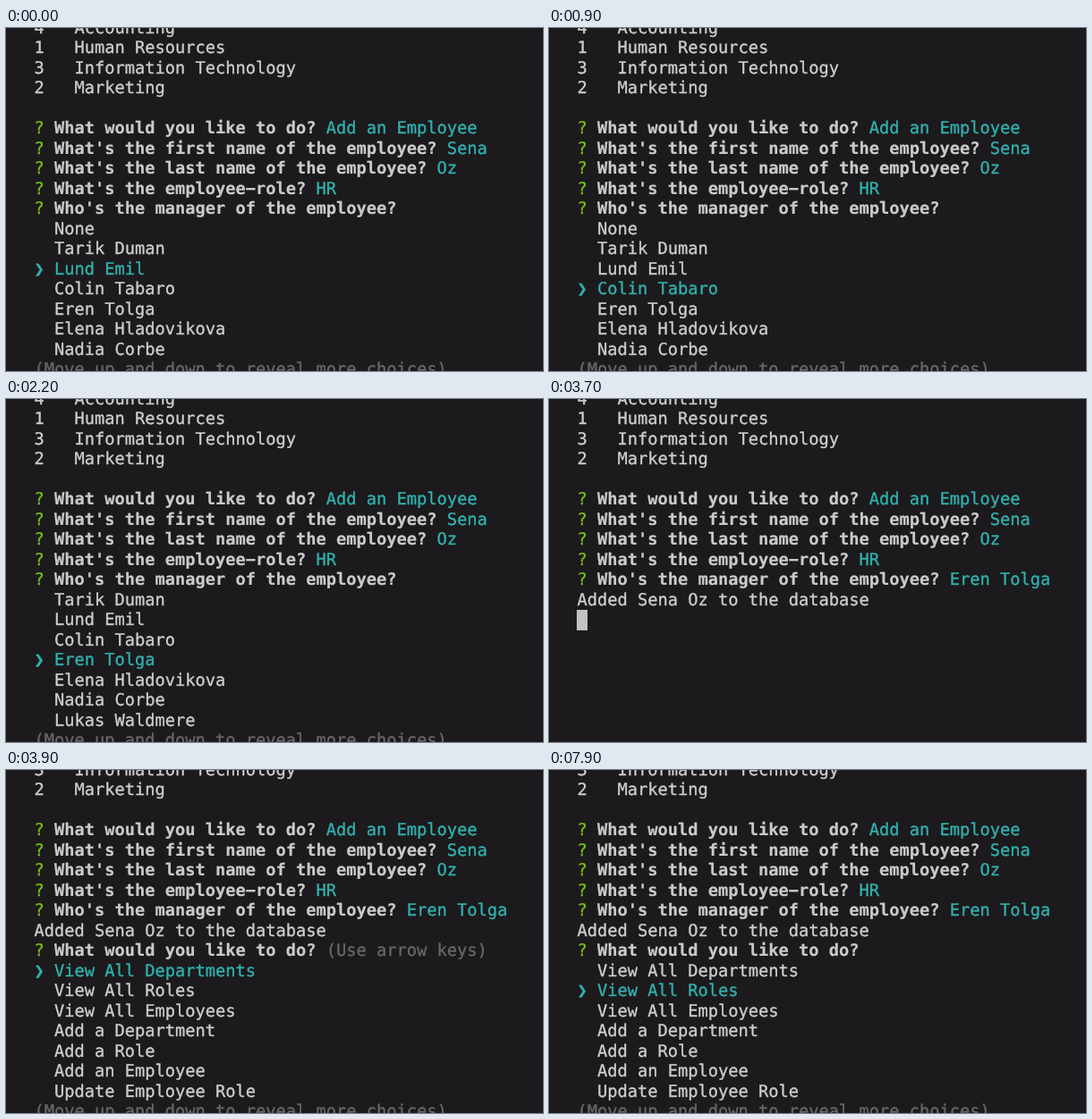
Write an HTML page that moves like this. It is 600 px wide and 384 px high and loops after 8 s.

```html
<!DOCTYPE html>
<html lang="en">
<head>
<meta charset="utf-8">
<title>Employee tracker</title>
<style>
  html, body { margin: 0; width: 100%; height: 100%; overflow: hidden; background: #1c1a1c; }
  #stage { position: relative; width: 600px; height: 384px; overflow: hidden; }
  #strip { animation: play 8s step-end infinite; }
  .screen { position: relative; height: 384px; overflow: hidden; }
  pre {
    position: absolute; left: 31.4px; top: -10.5px; margin: 0;
    font: 18.7px/22.5px "DejaVu Sans Mono", monospace;
    text-rendering: geometricPrecision; color: #cecdce;
    -webkit-text-stroke: 0.35px;
  }
  b { color: #cbcacb; -webkit-text-stroke-width: 0.2px; }
  .ask { color: #74c010; }
  .pick { color: #30b1af; }
  .hint { color: #686668; }
  .mark, .cursor { display: inline-block; width: 2ch; height: 22.5px; vertical-align: top; }
  .cursor { position: relative; top: -1px; width: 1ch; background: #c3c2c3; }
  @keyframes play {
    0% { transform: translateY(0); }
    11.25% { transform: translateY(-384px); }
    23.75% { transform: translateY(-768px); }
    46.25% { transform: translateY(-1152px); }
    47.5% { transform: translateY(-1536px); }
    98.75%, 100% { transform: translateY(-1920px); }
  }
</style>
</head>
<body>
<div id="stage"><div id="strip"></div></div>
<script>
  const span = (cls, text = '') => `<span class="${cls}">${text}</span>`;
  const ask = (question, answer = '', cls = 'pick') =>
    `${span('ask', '?')} <b>${question}</b> ${span(cls, answer)}`;
  const menu = (items, selected) => [
    ...items.map((item, i) => i === selected
      ? span('pick', span('mark', '❯') + item)
      : '  ' + item),
    span('hint', '(Move up and down to reveal more choices)')
  ];

  const departments = ['4   Accounting', '1   Human Resources', '3   Information Technology', '2   Marketing', ''];
  const task = 'What would you like to do?';
  const manager = "Who's the manager of the employee?";
  const form = [
    ...departments,
    ask(task, 'Add an Employee'),
    ask("What's the first name of the employee?", 'Sena'),
    ask("What's the last name of the employee?", 'Oz'),
    ask("What's the employee\u2212role?", 'HR')
  ];
  const people = ['None', 'Tarik Duman', 'Lund Emil', 'Colin Tabaro', 'Eren Tolga',
    'Elena Hladovikova', 'Nadia Corbe', 'Lukas Waldmere'];
  const actions = ['View All Departments', 'View All Roles', 'View All Employees', 'Add a Department',
    'Add a Role', 'Add an Employee', 'Update Employee Role'];

  const choose = (first, selected) =>
    [...form, ask(manager), ...menu(people.slice(first, first + 7), selected)];
  const added = [...form, ask(manager, 'Eren Tolga'), 'Added Sena Oz to the database'];
  const next = (hint, selected) =>
    [...added.slice(2), ask(task, hint, 'hint'), ...menu(actions, selected)];

  const screens = [
    choose(0, 2),
    choose(0, 3),
    choose(1, 3),
    [...added, span('cursor')],
    next('(Use arrow keys)', 0),
    next('', 1)
  ];
  document.getElementById('strip').innerHTML = screens
    .map(lines => `<div class="screen"><pre>${lines.join('\n')}</pre></div>`)
    .join('');
</script>
</body>
</html>
```
